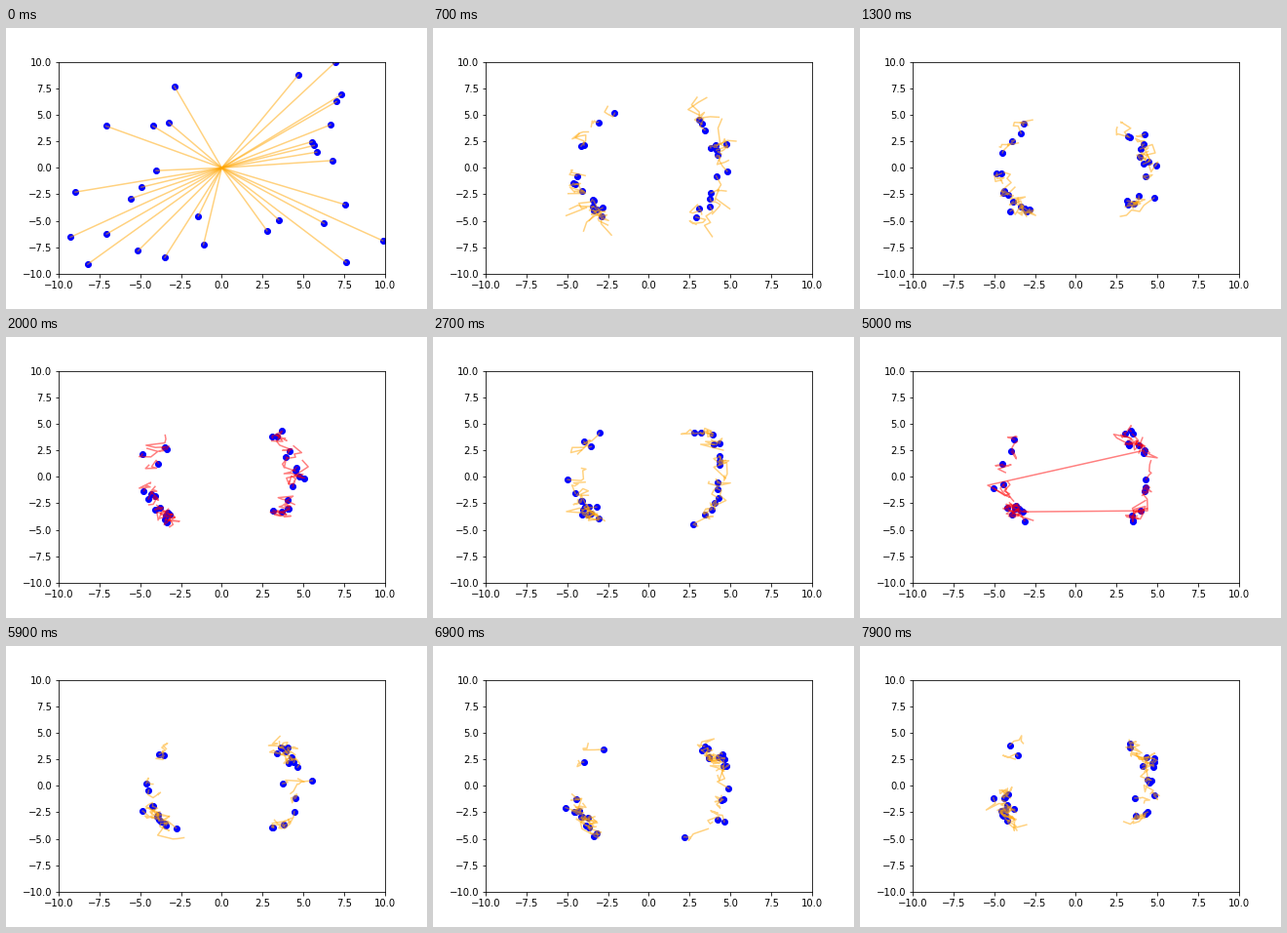
These frames come from a looping animation (432 by 288 pixels, 8 s). A matplotlib script:

```python
import numpy as np
import matplotlib.pyplot as plt
from matplotlib.animation import FuncAnimation

FRAMES = 80
TAIL = 6          # positions kept in each trail
GLOBAL_EVERY = 5  # every fifth step proposes long jumps
RADIUS, CENTER = 4.9, 3.9

# accepted long jumps: step, from, to
JUMPS = [
    (35, (-4.5, -1.4), (4.9, 1.6)),
    (50, (-5.4, -0.8), (4.2, 2.5)),
    (50, (4.4, -3.2), (-3.25, -3.3)),
]


def scatter_arc(rng, count, first, last):
    """Points fanned out between two angles, inside the square."""
    a = np.radians(np.linspace(first, last, count) + rng.uniform(-3, 3, count))
    ray = np.column_stack([np.cos(a), np.sin(a)])
    edge = 10 / np.abs(ray).max(axis=1, keepdims=True)
    return ray * edge * rng.uniform(0.4, 1, (count, 1))


def local_step(pos, rng):
    """Langevin move towards two facing arcs of a ring."""
    r = np.linalg.norm(pos, axis=1, keepdims=True)
    out = pos / r
    along = np.column_stack([-out[:, 1], out[:, 0]])
    move = 0.35 * (RADIUS - r) * out
    move[:, 0] += 0.22 * (np.sign(pos[:, 0]) * CENTER - pos[:, 0])
    noise = rng.normal(size=pos.shape)
    return pos + move + 0.28 * noise[:, :1] * out + 0.38 * noise[:, 1:] * along


def simulate():
    rng = np.random.default_rng(7)
    start = np.vstack([scatter_arc(rng, 9, 5, 60), scatter_arc(rng, 4, 110, 153),
                       scatter_arc(rng, 11, 184, 262), scatter_arc(rng, 6, 295, 336)])
    # leading zeros give the first trails their rays from the center
    path = np.zeros((FRAMES + TAIL - 1, len(start), 2))
    path[TAIL - 1] = start
    for n in range(1, FRAMES):
        k = n + TAIL - 1
        path[k] = local_step(path[k - 1], rng)
        for step, a, b in JUMPS:
            if step == n:
                i = np.argmin(np.linalg.norm(path[k - 1] - a, axis=1))
                path[k - 1, i], path[k, i] = a, b
    return path


path = simulate()

fig, ax = plt.subplots(figsize=(6, 4), dpi=72)
fig.subplots_adjust(left=0.125, right=0.9, bottom=0.125, top=0.88)
ax.set(xlim=(-10, 10), ylim=(-10, 10),
       xticks=np.linspace(-10, 10, 9), yticks=np.linspace(-10, 10, 9))
dots = ax.scatter(*path[TAIL - 1].T, color="blue")
trails = [ax.plot([], [], alpha=0.5)[0] for _ in range(path.shape[1])]


def update(n):
    tail = path[n:n + TAIL]
    dots.set_offsets(tail[-1])
    color = "red" if n and n % GLOBAL_EVERY == 0 else "orange"
    for i, line in enumerate(trails):
        line.set_data(tail[:, i, 0], tail[:, i, 1])
        line.set_color(color)
    return [dots, *trails]


anim = FuncAnimation(fig, update, frames=FRAMES, interval=100,
                     init_func=lambda: update(0), repeat=True, repeat_delay=0)
plt.show()
```
